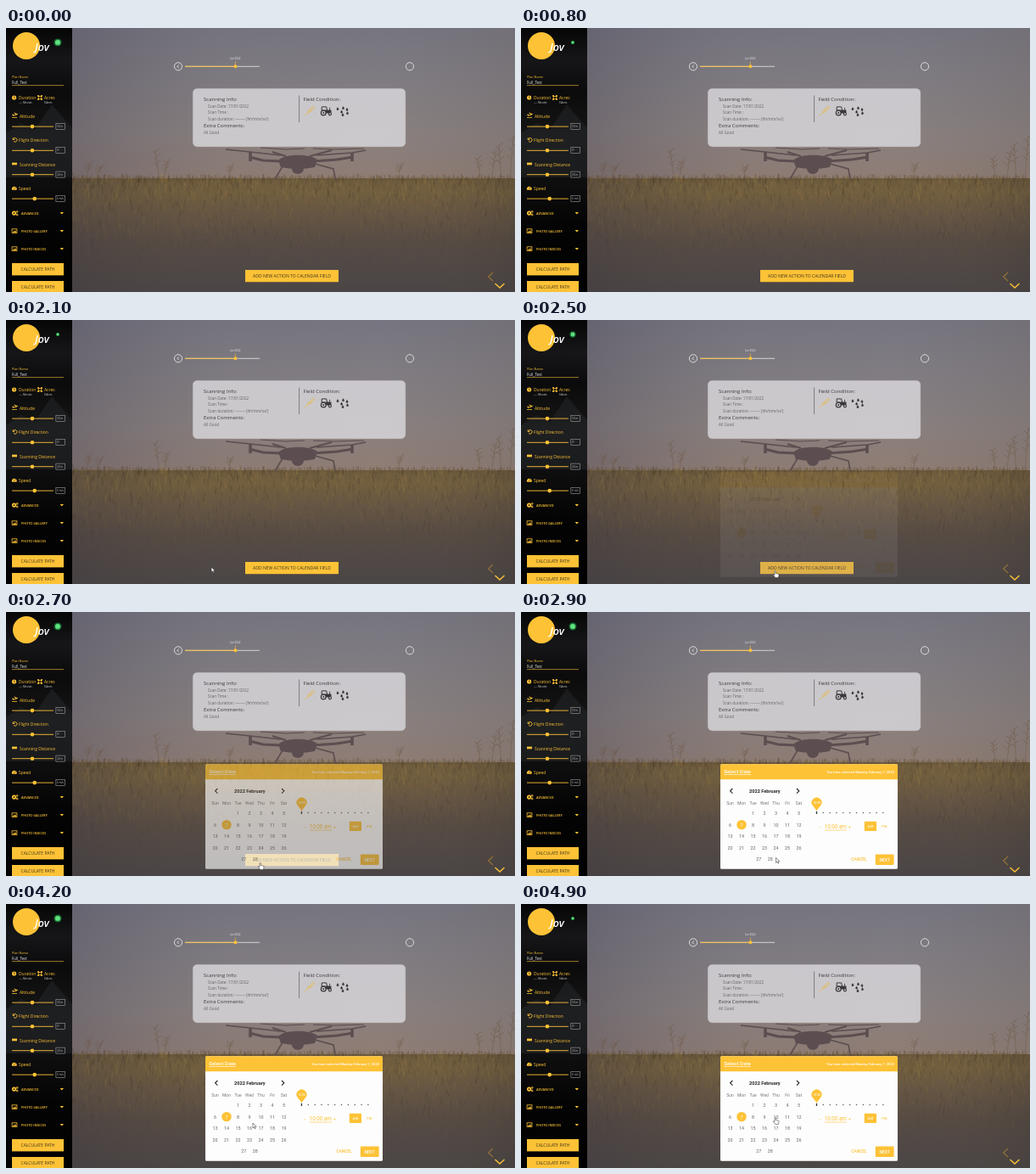
An HTML page with a canvas that plays this animation: 600 px wide and 311 px high, repeating every 5000 ms.

```html
<!DOCTYPE html>
<html lang="en">
<head>
<meta charset="utf-8">
<title>Flight planner</title>
<style>
  html, body { margin: 0; width: 100%; height: 100%; overflow: hidden; background: #050506; }
  canvas, svg { position: absolute; left: 0; top: 0; width: 600px; height: 311px; display: block; }
  text { font-family: "Open Sans", sans-serif; }
  .roboto text { font-family: Roboto, sans-serif; }
</style>
</head>
<body>
<canvas id="photo" width="600" height="311"></canvas>
<svg id="ui" viewBox="0 0 600 311"></svg>
<script>
const LOOP = 5000, STEP = 100;
const GOLD = '#fdc236', INK = '#3a373b', SOFT = '#636064';
const ui = document.getElementById('ui');

// ---- helpers ----
function add(parent, tag, attrs, label) {
  const node = document.createElementNS('http://www.w3.org/2000/svg', tag);
  for (const key in attrs) node.setAttribute(key, attrs[key]);
  if (label !== undefined) node.textContent = label;
  parent.appendChild(node);
  return node;
}
const group = (parent, attrs = {}) => add(parent, 'g', attrs);
const text = (g, x, y, label, size, fill, more = {}) =>
  add(g, 'text', { x, y, 'font-size': size, fill, ...more }, label);
const mid = { 'text-anchor': 'middle' };
const rect = (g, x, y, width, height, fill, more = {}) =>
  add(g, 'rect', { x, y, width, height, fill, ...more });
const dot = (g, cx, cy, r, fill, more = {}) => add(g, 'circle', { cx, cy, r, fill, ...more });
const line = (g, d, stroke, width = 1, more = {}) =>
  add(g, 'path', { d, stroke, 'stroke-width': width, fill: 'none', ...more });
const shape = (g, d, fill, more = {}) => add(g, 'path', { d, fill, ...more });

function seeded(seed) {
  return () => (seed = (seed * 16807) % 2147483647) / 2147483647;
}

// ---- backdrop: dusk field with a drone silhouette ----
function drawPhoto() {
  const c = document.getElementById('photo').getContext('2d');
  const rnd = seeded(71);
  const horizon = 177;
  const fill = (x0, y0, x1, y1, stops, x, y, w, h) => {
    const g = c.createLinearGradient(x0, y0, x1, y1);
    stops.forEach(([at, color]) => g.addColorStop(at, color));
    c.fillStyle = g;
    c.fillRect(x, y, w, h);
  };
  const stroke = (w, ...p) => {
    c.lineWidth = w;
    c.beginPath();
    for (let i = 0; i < p.length; i += 2) c.lineTo(p[i], p[i + 1]);
    c.stroke();
  };
  const sprig = (x, h, lean) => {
    c.strokeStyle = 'rgba(104,82,58,.5)';
    stroke(0.7, x, horizon + 4, x + lean, horizon - h);
    for (let k = 0; k < 6; k++) {
      const p = 0.45 + k * 0.1, px = x + lean * p, py = horizon - h * p;
      stroke(1, px, py, px + (k % 2 ? 4 : -4), py - 4);
    }
  };

  fill(0, 0, 0, horizon, [[0, '#767580'], [0.35, '#807c82'], [0.7, '#89807f'], [1, '#8f7d74']], 78, 0, 522, 180);
  fill(78, 0, 600, 0, [[0, 'rgba(80,76,90,.42)'], [0.35, 'rgba(100,96,104,.08)'],
    [0.7, 'rgba(110,104,106,0)'], [1, 'rgba(104,95,92,.25)']], 78, 0, 522, 180);

  fill(0, horizon, 0, 311, [[0, '#6d5b3e'], [0.12, '#725f3f'], [0.32, '#655543'],
    [0.55, '#574c44'], [1, '#4a4546']], 78, horizon, 522, 311 - horizon);
  fill(78, 0, 600, 0, [[0, 'rgba(62,56,62,.35)'], [0.3, 'rgba(80,70,60,0)'],
    [0.8, 'rgba(90,75,60,0)'], [1, 'rgba(58,52,48,.25)']], 78, horizon, 522, 311 - horizon);

  c.filter = 'blur(.7px)';
  // ragged skyline
  for (let x = 78; x < 600; x += 1.6) {
    c.strokeStyle = 'rgba(104,84,56,.45)';
    stroke(1.3, x, horizon + 3, x + (rnd() - 0.5) * 4, horizon - 5 * rnd());
  }
  // blades: golden near the skyline, fading towards the viewer
  for (let i = 0; i < 1100; i++) {
    const depth = rnd() * rnd(), x = 78 + rnd() * 522, y = horizon + 4 + depth * 125;
    const alpha = 0.17 * (1 - depth);
    c.strokeStyle = rnd() < 0.55 ? `rgba(166,134,74,${alpha})` : `rgba(52,42,32,${alpha})`;
    stroke(0.8 + rnd(), x, y, x + (rnd() - 0.5) * 5, y - 4 - rnd() * 7);
  }
  [[95, 17, 3], [106, 14, 6], [181, 33, -5], [186, 20, 4], [262, 14, 3], [462, 16, 3],
   [560, 24, -4], [572, 32, 5], [584, 40, -3], [594, 50, 4]].forEach(s => sprig(...s));

  // drone
  c.filter = 'blur(.4px)';
  c.strokeStyle = c.fillStyle = '#5c4e50';
  stroke(1.4, 259, 143, 288, 146, 324, 150);
  stroke(1.2, 300, 141, 330, 143, 352, 142);
  stroke(1.4, 366, 150, 408, 147, 424, 144);
  stroke(1.2, 362, 142, 386, 143, 422, 142);
  stroke(3.2, 324, 157, 303, 156, 287, 152);
  stroke(3.2, 362, 157, 390, 155, 409, 152);
  stroke(3.6, 288, 146, 288, 157);
  stroke(3.6, 408, 147, 408, 157);
  stroke(2, 330, 151, 314, 146);
  stroke(2, 358, 151, 384, 144);
  stroke(1.6, 326, 163, 317, 178);
  stroke(1.6, 364, 160, 386, 166, 388, 178);
  c.beginPath();
  c.moveTo(321, 156);
  c.bezierCurveTo(328, 148, 358, 148, 367, 155);
  c.lineTo(364, 164);
  c.quadraticCurveTo(344, 168, 324, 164);
  c.fill();
  c.beginPath();
  c.ellipse(344, 166, 7, 6, 0, 0, 7);
  c.fill();
  c.filter = 'none';

  // sidebar
  fill(0, 0, 0, 311, [[0, '#060607'], [0.12, '#161618'], [0.24, '#0b0b0c'], [0.42, '#161617'],
    [0.6, '#0d0d0e'], [0.75, '#040404'], [1, '#010101']], 0, 0, 78, 311);
  c.fillStyle = 'rgba(44,45,48,.4)';
  c.beginPath();
  [[0, 124], [18, 112], [34, 120], [54, 90], [78, 118], [78, 176], [0, 176]].forEach(p => c.lineTo(...p));
  c.fill();
}

// ---- sidebar ----
function drawSidebar() {
  const g = group(ui);
  dot(g, 24, 21, 16, GOLD);
  text(g, 34, 26.5, 'Jov', 12.5, '#fff', { 'font-style': 'italic', 'font-weight': 600 });

  text(g, 7, 58.7, 'Plan Name', 3.75, GOLD);
  text(g, 7, 66, 'Full_Test', 4.5, '#eee');
  line(g, 'M7 67.6H68', GOLD, 0.6);

  dot(g, 9.6, 82, 2.6, GOLD);
  line(g, 'M9.6 80.3V82.2L10.9 83', '#111', 0.6);
  text(g, 15, 83.9, 'Duration', 4.95, GOLD);
  text(g, 15, 89.4, '--:-- Minutes', 2.8, '#ddd');
  line(g, 'M38.4 80.5H41.6V83.7H38.4Z', GOLD, 0.8);
  [[38, 80], [42, 80], [38, 84], [42, 84]].forEach(([x, y]) => rect(g, x - 0.9, y - 0.9, 1.8, 1.8, GOLD));
  text(g, 45, 83.9, 'Acres', 4.95, GOLD);
  text(g, 45, 89.4, '0 Acres', 2.8, '#ddd');

  shape(g, 'M7 102L8 101.5L9.5 102.6L11.5 101.8L9 100L10 99.7L13 101L14 100.8L13.5 102L8.5 103.8ZM7 105H13V105.8H7Z', GOLD);
  line(g, 'M8.2 129.3V131.5H10.2M8.5 131.2A2.3 2.3 0 1 1 9 133.4', GOLD, 0.9);
  rect(g, 7, 158.6, 6, 2.7, GOLD);
  shape(g, 'M7 190.8A3 3 0 1 1 12.6 190.8Z', GOLD);
  line(g, 'M9.8 189.5L11 187.3', '#111', 0.6);

  [['Altitude', 16, 106, 31, '50 m'], ['Flight Direction', 15, 134.2, 31, '0°'],
   ['Scanning Distance', 16, 162.6, 31, '20 m'], ['Speed', 15, 191, 33.7, '6 m/s']
  ].forEach(([name, x, y, knob, value]) => {
    text(g, x, y, name, 4.95, GOLD);
    line(g, `M7 ${y + 10.1}H56`, GOLD, 0.9);
    dot(g, knob, y + 10.1, 2.3, GOLD);
    rect(g, 58.9, y + 6.5, 10.4, 7, 'none', { stroke: '#bbb', 'stroke-width': 0.5 });
    text(g, 60.2, y + 11.2, value, 3, '#ccc');
  });

  dot(g, 9.6, 218.1, 1.8, 'none', { stroke: GOLD, 'stroke-width': 1.7 });
  [[13.2, 216.4], [13.2, 220]].forEach(([x, y]) => dot(g, x, y, 0.9, 'none', { stroke: GOLD, 'stroke-width': 0.9 }));
  [239, 260].forEach(y => {
    rect(g, 7.1, y - 2.2, 5.8, 4.6, 'none', { stroke: GOLD, 'stroke-width': 0.8 });
    shape(g, `M7.8 ${y + 1.7}L9.2 ${y}L10 ${y + 0.7}L11.2 ${y - 0.7}L12.3 ${y + 1.7}Z`, GOLD);
  });
  ['ADVANCED', 'PHOTO GALLERY', 'PHOTO INDICES'].forEach((name, i) => {
    const y = 218 + i * 21;
    text(g, 18, y + 1.5, name, 3.85, GOLD, { 'font-weight': 600 });
    shape(g, `M63.6 ${y - 1}H68L65.8 ${y + 1.4}Z`, GOLD);
  });
  [277, 298].forEach(y => {
    rect(g, 7, y, 61, 14.4, GOLD);
    text(g, 37.5, y + 9, 'CALCULATE PATH', 5, '#3d3420', mid);
  });
}

// ---- main area ----
function drawMain() {
  const g = group(ui);
  const ring = { stroke: '#f2f0f0', 'stroke-width': 0.8 };
  dot(g, 203, 45.3, 4.6, 'none', ring);
  dot(g, 476, 45.3, 4.6, 'none', ring);
  line(g, 'M203.9 43.4L202 45.3L203.9 47.2', '#f2f0f0', 0.8);
  line(g, 'M211 45.3H299', '#dedcdd', 0.9);
  line(g, 'M211 45.3H270.4', GOLD, 0.9);
  line(g, 'M270.4 39.5V45', GOLD, 0.6);
  dot(g, 270.4, 45.3, 2, GOLD);
  text(g, 270.4, 37, 'Jan 2022', 3, '#f2f0f0', mid);

  rect(g, 220.4, 71.4, 250.4, 68.4, 'rgba(221,219,223,.8)', { rx: 5, stroke: 'rgba(232,230,232,.4)', 'stroke-width': 0.6 });
  text(g, 233, 86, 'Scanning Info:', 6, INK);
  text(g, 238, 93.7, 'Scan Date: 17/01/2022', 4.6, SOFT);
  text(g, 238, 101, 'Scan Time :', 4.6, SOFT);
  text(g, 238, 108.6, 'Scan duration: -------- (hh/mm/ss/)', 4.6, SOFT);
  text(g, 233, 117, 'Extra Comments:', 6, INK);
  text(g, 233, 125, 'All Good', 4.6, SOFT);
  line(g, 'M345.6 79.5V111', '#6b686b', 0.8);
  text(g, 350.5, 86, 'Field Condition:', 6, INK);

  // wheat, tractor, drops
  line(g, 'M352 103L360.5 95.5', '#e9b93c', 0.7);
  [0, 1, 2, 3].forEach(i => {
    const x = 356 + i * 2, y = 99.4 - i * 1.8;
    line(g, `M${x} ${y}L${x + 0.4} ${y - 2.8}M${x} ${y}L${x + 2.8} ${y - 0.2}`, '#e9b93c', 0.6);
  });
  line(g, 'M372.2 97V92.9H377.7L378.5 96.8', INK, 1);
  shape(g, 'M372 96.5H383.4V100.5H372Z', INK);
  line(g, 'M381.6 96.5V93.8', INK, 0.9);
  dot(g, 374.2, 100, 2.9, '#c6c4c7', { stroke: INK, 'stroke-width': 1.2 });
  dot(g, 374.2, 100, 1, INK);
  dot(g, 381.9, 101.3, 1.6, '#c6c4c7', { stroke: INK, 'stroke-width': 1.1 });
  [[391, 94], [395.6, 97.5], [397.5, 93], [402, 94.8], [402.5, 99], [397, 101]].forEach(([x, y]) =>
    shape(g, `M${x} ${y - 1}C${x + 0.4} ${y + 0.3} ${x + 1.6} ${y + 1} ${x + 1.3} ${y + 2}A1.4 1.4 0 0 1 ${x - 1.3} ${y + 2}C${x - 1.6} ${y + 1} ${x - 0.4} ${y + 0.3} ${x} ${y - 1}Z`, INK));

  const action = group(ui);
  const face = rect(action, 282, 285, 110, 14.2, GOLD);
  text(action, 337, 294.1, 'ADD NEW ACTION TO CALENDAR FIELD', 5.05, '#3d3420', mid);
  line(ui, 'M574 288L568.6 293L574 298', '#8f7137', 1.2);
  line(ui, 'M576.5 301L582 306L587.5 301', GOLD, 1.4);
  return face;
}

// ---- date dialog ----
function drawDialog() {
  const g = group(ui, { class: 'roboto' });
  rect(g, 235, 179.3, 209, 123.5, '#fdfdfd', { rx: 1.6 });
  shape(g, 'M235 197.3V180.9Q235 179.3 236.6 179.3H442.4Q444 179.3 444 180.9V197.3Z', GOLD);
  text(g, 239.3, 190.3, 'Select Date', 6.2, '#fff', { 'font-weight': 500 });
  line(g, 'M239.3 191.5H271', '#fff', 0.6);
  text(g, 440, 189.7, 'You have selected Monday February 7, 2022', 4.05, '#fff', { 'text-anchor': 'end', 'font-weight': 500 });

  line(g, 'M249.4 208L246.6 210.8L249.4 213.6M325 208L327.8 210.8L325 213.6', '#222', 1.1);
  text(g, 287.3, 213, '2022 February', 5.6, '#222', { ...mid, 'font-weight': 700 });
  const col = i => 246.5 + i * 13.5;
  ['Sun', 'Mon', 'Tue', 'Wed', 'Thu', 'Fri', 'Sat'].forEach((d, i) =>
    text(g, col(i), 226.8, d, 5, '#777', mid));
  dot(g, col(1), 250.6, 5.7, GOLD);
  for (let day = 1; day <= 28; day++) {
    const cell = day + 1, row = Math.floor(cell / 7);
    const x = row === 4 ? 280.3 + (day - 27) * 13.5 : col(cell % 7);
    text(g, x, 239 + row * 13.5, day, 5.4, day === 7 ? '#fff' : '#666', mid);
  }

  shape(g, 'M343.4 227.6A6 6 0 1 1 353.6 227.6L348.5 234Z', GOLD);
  text(g, 348.5, 225.9, '10:00', 3.7, '#fff', mid);
  rect(g, 347.8, 234.8, 1.3, 3.2, '#333');
  for (let i = 1; i <= 10; i++) dot(g, 348.4 + i * 7.85, 236.6, 0.75, '#555');
  text(g, 352, 254.6, '−', 5.5, GOLD, mid);
  text(g, 370.8, 254.8, '10:00 am', 6.3, GOLD, mid);
  line(g, 'M358 257H384', GOLD, 0.6);
  text(g, 387.3, 254.6, '+', 5.5, GOLD, mid);
  rect(g, 404.8, 246.8, 14.2, 11.2, GOLD, { rx: 0.8 });
  text(g, 411.9, 253.9, 'AM', 4.3, '#fff', mid);
  text(g, 428.2, 253.9, 'PM', 4.3, GOLD, mid);
  text(g, 398.5, 293.4, 'CANCEL', 4.9, GOLD, { ...mid, 'font-weight': 500 });
  rect(g, 417.8, 285.6, 21.8, 12.3, GOLD, { rx: 0.8 });
  text(g, 428.7, 293.5, 'NEXT', 4.9, '#fff', { ...mid, 'font-weight': 500 });
  return g;
}

function drawBadge() {
  const g = group(ui);
  dot(g, 0, 0, 4.4, '#1f9a46', { opacity: 0.65 });
  dot(g, 0, 0, 2.9, '#5fe07e');
  return g;
}

function drawPointers() {
  const edge = { stroke: '#222', 'stroke-width': 0.5, 'stroke-linejoin': 'round' };
  const arrow = group(ui), hand = group(ui);
  shape(arrow, 'M0 0V6L1.4 4.7L2.4 6.8L3.3 6.4L2.4 4.4H4.2Z', '#fff', edge);
  shape(hand, 'M0 0Q.8 -.8 1.4 0V2.6L4.6 3.2Q5.2 3.5 5 5L4.3 7.4H.8L-1.6 4.4Q-1.6 3.4 -.6 3.9L0 4.4Z', '#fff', edge);
  return { arrow, hand };
}

drawPhoto();
drawSidebar();
const face = drawMain();
const dialog = drawDialog();
const badge = drawBadge();
const pointers = drawPointers();

// ---- motion ----
// time, x, y, pointer kind from then on
const path = [
  [1100, 8, 312, 'arrow'], [1400, 12, 271, 'arrow'], [1600, 12, 271, 'arrow'],
  [2300, 299, 296, 'hand'], [2800, 299, 296, 'arrow'], [3400, 320, 207, 'arrow'],
  [3600, 320, 207, 'arrow'], [4200, 291, 258, 'arrow'], [4500, 299, 252, 'hand'], [5000, 299, 252, 'hand']
];
const ease = p => p * p * (3 - 2 * p);
const clamp = p => Math.max(0, Math.min(1, p));

function render(t) {
  const r = (3.4 + 1.2 * Math.cos(2 * Math.PI * t / 1400)) / 4.4;
  badge.setAttribute('transform', `translate(61 17) scale(${r})`);

  const shown = ease(clamp((t - 2430) / 450));
  dialog.setAttribute('opacity', shown);
  face.setAttribute('fill', t >= 2300 ? '#dcab3b' : GOLD);

  for (const kind in pointers) pointers[kind].setAttribute('visibility', 'hidden');
  const i = path.findIndex((p, n) => n < path.length - 1 && t >= p[0] && t < path[n + 1][0]);
  if (i < 0) return;
  const [t0, x0, y0, kind] = path[i], [t1, x1, y1] = path[i + 1];
  const p = ease((t - t0) / (t1 - t0));
  pointers[kind].setAttribute('visibility', 'visible');
  pointers[kind].setAttribute('transform', `translate(${x0 + (x1 - x0) * p} ${y0 + (y1 - y0) * p})`);
}

function tick() {
  render(Math.floor((performance.now() % LOOP) / STEP) * STEP);
  requestAnimationFrame(tick);
}
tick();
</script>
</body>
</html>
```
